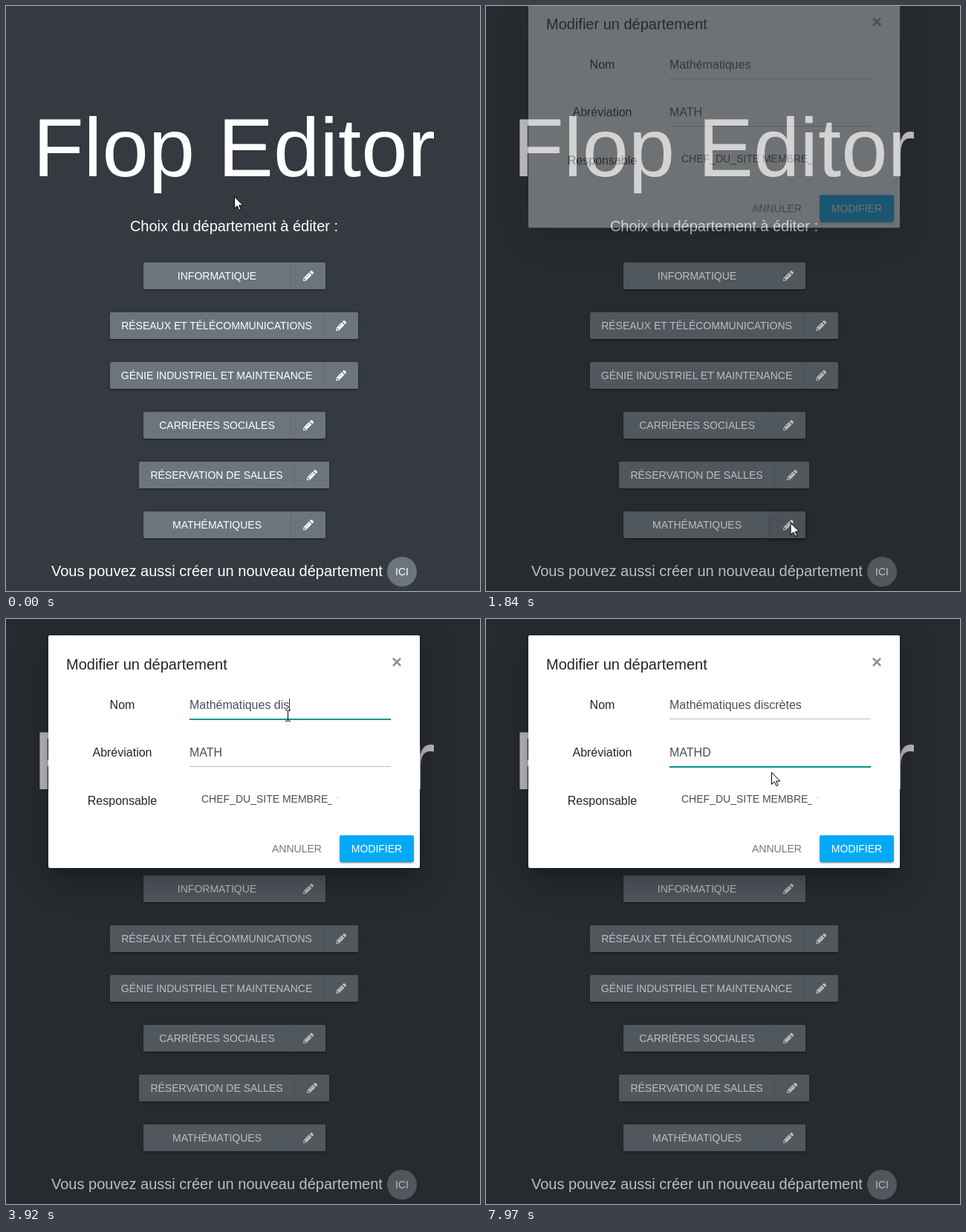
These frames come from a looping animation (638 px wide and 787 px high, 8000 ms). An HTML page:

```html
<!DOCTYPE html>
<html lang="fr">
<head>
<meta charset="utf-8">
<title>Flop Editor</title>
<style>
html, body { margin: 0; width: 100%; height: 100%; overflow: hidden; }
body { background: #343a40; color: #fff; font: 16px/17px Arial, "Liberation Sans", sans-serif; }
#stage { position: absolute; inset: 0; width: 638px; height: 787px; overflow: hidden; background: #343a40; }
#stage div, .tri { position: absolute; white-space: pre; }
.mid { left: 0; width: 614px; text-align: center; }
.big { font-size: 112px; line-height: 125px; }
.h { font-size: 20px; line-height: 22px; }
.small { font-size: 14px; line-height: 16px; }

/* department buttons */
#stage .dep, #stage .ok {
  height: 36px; border-radius: 2px; font-size: 14px; line-height: 36px; text-align: center;
  box-shadow: 0 2px 2px rgba(0,0,0,.14), 0 3px 1px -2px rgba(0,0,0,.2), 0 1px 5px rgba(0,0,0,.12);
}
.dep { display: flex; background: #6c757d; }
.dep span { flex: 1; border-radius: 2px 0 0 2px; }
.dep i {
  position: relative; width: 46px; border-left: 1px solid #626a71;
  background-clip: padding-box; border-radius: 0 2px 2px 0;
}
.dep svg { position: absolute; left: 16px; top: 11px; width: 14px; height: 14px; fill: currentColor; }
.ici { left: 513px; top: 741px; width: 40px; height: 40px; border-radius: 50%; background: #6c757d; font-size: 14px; line-height: 40px; text-align: center; }
.ripple::before {
  content: ""; position: absolute; left: 12px; top: 7px; width: 22px; height: 22px;
  border-radius: 50%; background: rgba(0,0,0,.1); animation: ripple 8s infinite;
}
.hov1 { animation: hov1 8s linear infinite; }
.hov2 { animation: hov2 8s linear infinite; }
.ripple { animation: hov3 8s linear infinite; }
@keyframes hov1 { 0%, 8.5%, 11.5%, 100% { background-color: #6c757d; } 9.1% { background-color: #8b9299; } }
@keyframes hov2 { 0%, 12.4%, 15.5%, 100% { background-color: #6c757d; } 13.25% { background-color: #a0a6ab; } }
@keyframes hov3 {
  0%, 14.2%, 37%, 100% { background-color: #6c757d; color: #fff; box-shadow: none; }
  16.4%, 21.1% { background-color: #eee; color: #6c757d; box-shadow: none; }
  22.8%, 36% { background-color: #666e75; color: #fff; box-shadow: 0 2px 6px rgba(0,0,0,.3); }
}
@keyframes ripple {
  0%, 20% { transform: scale(0); opacity: 1; }
  21% { transform: scale(1); opacity: 1; }
  22.5%, 100% { transform: scale(1.6); opacity: 0; }
}

/* dialog */
.shade { inset: 0; background: #000; animation: shade 8s linear infinite; }
.modal {
  left: 57px; top: 22px; width: 500px; height: 313px; border-radius: 2px; background: #fff; color: #212529;
  box-shadow: 0 11px 15px -7px rgba(0,0,0,.2), 0 24px 38px 3px rgba(0,0,0,.14), 0 9px 46px 8px rgba(0,0,0,.12);
  animation: fade 8s linear infinite, drop 8s infinite;
}
@keyframes shade { 0%, 20.5625% { opacity: 0; } 22.4375%, 100% { opacity: .26; } }
@keyframes fade { 0%, 22.375% { opacity: 0; } 24.25%, 100% { opacity: 1; } }
@keyframes drop {
  0%, 22.375% { transform: translateY(-50px); animation-timing-function: ease-out; }
  26.125%, 100% { transform: none; }
}
.lab { left: 0; width: 199px; text-align: center; }
.close { left: 462px; top: 22px; font: bold 24px/27px Arial, "Liberation Sans", sans-serif; opacity: .5; }
#stage .who { left: 206px; top: 212px; width: 176px; overflow: hidden; color: #495057; }
.tri { left: 386px; top: 217px; border: 4px solid transparent; border-top-color: #f0f0f0; }
.ok { left: 392px; top: 269px; width: 100px; background: #03a9f4; color: #fff; }
.field { left: 190px; width: 271px; height: 29px; display: flex; color: #495057; }
.field::before, .field::after { content: ""; position: absolute; left: 0; right: 0; top: 27px; height: 1px; background: #bfbfbf; }
.field::after { height: 2px; background: #009688; }
.typed { height: 17px; overflow: hidden; border-right: 1px solid transparent; width: 0; }
.nom .typed { animation: typeNom 8s step-end infinite; }
.abr .typed { animation: typeAbr 8s step-end infinite; }
.nom::after { animation: lineNom 8s infinite; }
.abr::after { animation: lineAbr 8s infinite; }
@keyframes lineNom {
  0%, 36.5% { transform: scaleX(0); animation-timing-function: ease-out; }
  40.2%, 82.39% { transform: none; }
  82.4%, 100% { transform: scaleX(0); }
}
@keyframes lineAbr {
  0%, 82.4% { transform: scaleX(0); animation-timing-function: ease-out; }
  86%, 100% { transform: none; }
}
/* width uncovers the letters, the right border is the caret */
@keyframes typeNom {
  0% { width: 0; border-color: transparent; }
  36.5% { width: 0; border-color: #333; }
  43.1% { width: 0; border-color: transparent; }
  44.1% { width: 4.45px; border-color: #333; }
  45.9% { width: 13.35px; border-color: #333; }
  48.1% { width: 16.9px; border-color: #333; }
  48.9% { width: 24.9px; border-color: #333; }
  51% { width: 32.9px; border-color: #333; }
  52.9% { width: 38.2px; border-color: #333; }
  58.7% { width: 47.1px; border-color: #333; }
  61.5% { width: 51.55px; border-color: #333; }
  63.7% { width: 60.45px; border-color: #333; }
  65.5% { width: 69px; border-color: #333; }
  72.4% { width: 69px; border-color: transparent; }
  79.3% { width: 69px; border-color: #333; }
  82.4%, 100% { width: 69px; border-color: transparent; }
}
@keyframes typeAbr {
  0% { width: 0; border-color: transparent; }
  82.5% { width: 0; border-color: #333; }
  88.9% { width: 0; border-color: transparent; }
  90.8% { width: 11.6px; border-color: #333; }
  97%, 100% { width: 11.6px; border-color: transparent; }
}

/* pointer */
.mouse { left: 0; top: 0; width: 0; height: 0; animation: move 8s infinite; }
.mouse svg { position: absolute; left: 0; top: 0; overflow: visible; width: 1px; height: 1px; }
.arrow { fill: #fff; stroke: #000; animation: arrow 8s step-end infinite; }
.beam { fill: none; stroke: #000; animation: beam 8s step-end infinite; }
@keyframes move {
  0%, 5.5% { transform: translate(307px, 256px); animation-timing-function: ease-in-out; }
  15.25%, 21% { transform: translate(407px, 695px); animation-timing-function: linear; }
  23% { transform: translate(409.5px, 695px); animation-timing-function: ease-in; }
  24.875% { transform: translate(412.5px, 686px); animation-timing-function: cubic-bezier(.3, .1, .8, .9); }
  29.75% { transform: translate(395px, 343px); animation-timing-function: ease-out; }
  36%, 75% { transform: translate(379px, 130px); animation-timing-function: ease-in-out; }
  77.25%, 79% { transform: translate(377px, 170px); }
  81.25%, 96.4% { transform: translate(377px, 174px); animation-timing-function: ease-in-out; }
  99.5%, 100% { transform: translate(384px, 206px); }
}
@keyframes beam {
  0%, 34%, 75.5%, 98.4%, 100% { opacity: 0; }
  32.7%, 35.2%, 76.6% { opacity: 1; }
}
@keyframes arrow {
  0%, 34%, 75.5%, 98.4%, 100% { opacity: 1; }
  32.7%, 35.2%, 76.6% { opacity: 0; }
}
</style>
</head>
<body>
<svg width="0" height="0" style="position:absolute">
  <symbol id="pen" viewBox="0 0 14 14">
    <path fill-rule="evenodd" d="M7.8 2.6 11.4 6.2 4.1 13.4.5 14Q0 14 0 13.5L.6 9.9zM1.4 10.3 1.1 12.1 1.9 12.9 3.7 12.6V11.6H2.4V10.3zM3.4 8.9 3.8 9.3 8.2 4.9 7.8 4.5zM8.7 1.7 10.1.4Q11.1-.5 12 .4L13.6 2Q14.5 2.9 13.6 3.9L12.3 5.3z"/>
  </symbol>
</svg>
<div id="stage">
  <div class="mid big" style="top:128px">Flop Editor</div>
  <div class="mid h" style="top:285px">Choix du département à éditer :</div>

  <div class="dep" style="left:185px;top:345px;width:245px"><span class="hov1">INFORMATIQUE</span><i><svg><use href="#pen"/></svg></i></div>
  <div class="dep" style="left:140px;top:412px;width:334px"><span>RÉSEAUX ET TÉLÉCOMMUNICATIONS</span><i><svg><use href="#pen"/></svg></i></div>
  <div class="dep" style="left:140px;top:479px;width:334px"><span>GÉNIE INDUSTRIEL ET MAINTENANCE</span><i><svg><use href="#pen"/></svg></i></div>
  <div class="dep" style="left:185px;top:546px;width:245px"><span>CARRIÈRES SOCIALES</span><i><svg><use href="#pen"/></svg></i></div>
  <div class="dep" style="left:179px;top:613px;width:256px"><span>RÉSERVATION DE SALLES</span><i class="hov2"><svg><use href="#pen"/></svg></i></div>
  <div class="dep" style="left:185px;top:680px;width:245px"><span>MATHÉMATIQUES</span><i class="ripple"><svg><use href="#pen"/></svg></i></div>

  <div class="h" style="left:61px;top:749px">Vous pouvez aussi créer un nouveau département</div>
  <div class="ici">ICI</div>

  <div class="shade"></div>

  <div class="modal">
    <div class="h" style="left:24px;top:28px">Modifier un département</div>
    <div class="close">×</div>
    <div class="lab" style="top:85px">Nom</div>
    <div class="lab" style="top:149px">Abréviation</div>
    <div class="lab" style="top:214px">Responsable</div>
    <div class="field nom" style="top:85px"><span>Mathématiques</span><span class="typed"> discrètes</span></div>
    <div class="field abr" style="top:149px"><span>MATH</span><span class="typed">D</span></div>
    <div class="who small">CHEF_DU_SITE MEMBRE_</div>
    <span class="tri"></span>
    <div class="small" style="left:301px;top:279px;color:#757a7f">ANNULER</div>
    <div class="ok">MODIFIER</div>
  </div>

  <div class="mouse">
    <svg class="arrow"><path d="M.5.5v16l3.7-3.6 2.6 5.6 2.3-1-2.5-5.4h5.2z"/></svg>
    <svg class="beam"><path d="M-3-7.5h2L.5-6.5 2-7.5h2M.5-6.5v13M-3 7.5h2L.5 6.5 2 7.5h2"/></svg>
  </div>
</div>
</body>
</html>
```
